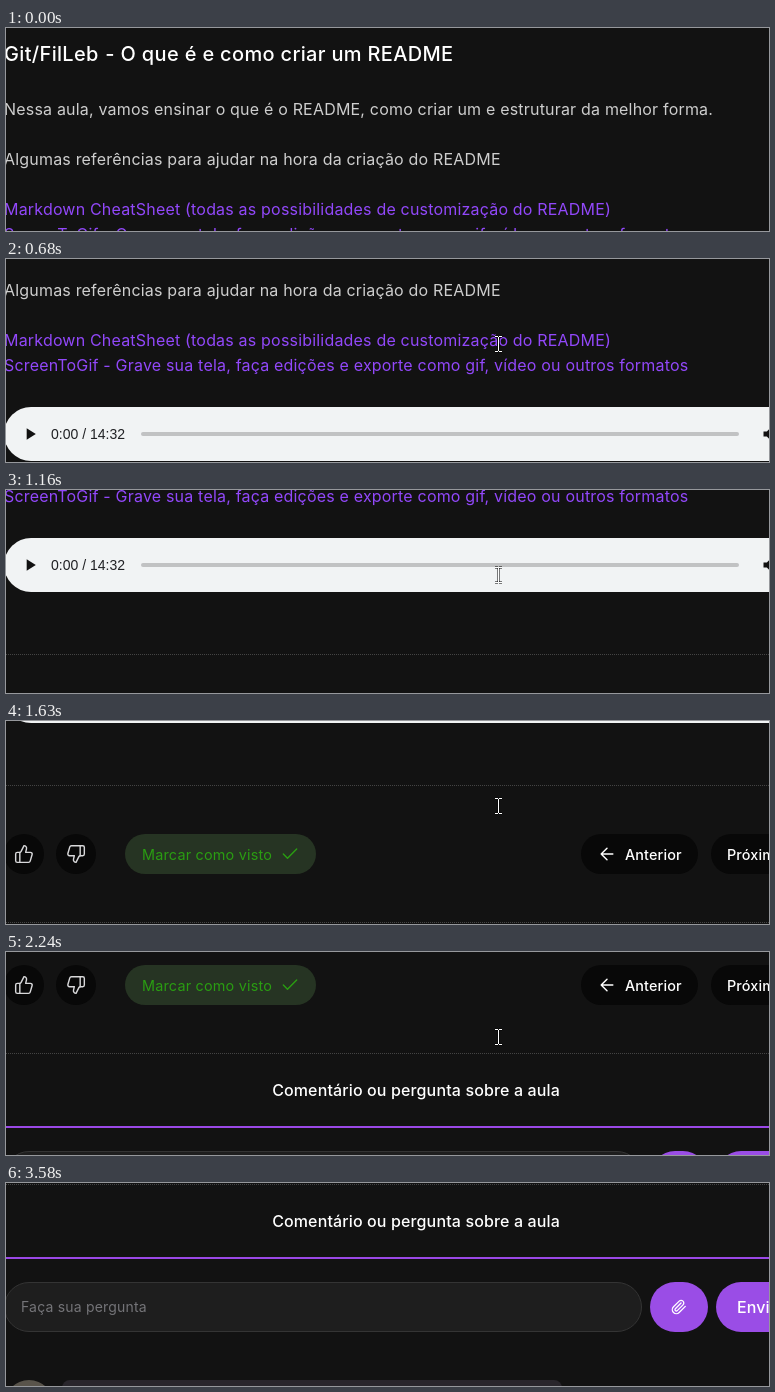
An HTML page for the animation above (4040 ms loop, 763 by 203 pixels).

```html
<!DOCTYPE html>
<html lang="pt-BR">
<head>
<meta charset="utf-8">
<title>Aula: README</title>
<style>
  html, body { margin: 0; width: 100%; height: 100%; overflow: hidden; background: #121212; }
  body { position: relative; font: 400 16px/25px Inter, "Noto Sans", sans-serif; font-optical-sizing: none;
         letter-spacing: .19px; color: #cecece; }
  #page, #page > *, #cursor { position: absolute; }
  #page { left: 0; top: 0; width: 763px; height: 760px; animation: scroll 4040ms step-end infinite; }
  #page > * { box-sizing: border-box; white-space: nowrap; }
  svg { fill: none; stroke: currentColor; stroke-width: 1.7; stroke-linecap: round; stroke-linejoin: round; flex: none; }

  .text { left: -2px; }
  .title { top: 14px; font-size: 20px; font-weight: 500; letter-spacing: .33px; color: #fff; }
  .title.rest { left: auto; right: 315.5px; }
  .link { color: #9248fa; }

  .audio { left: -2px; top: 248px; width: 820px; height: 54px; border-radius: 27px; background: #f1f3f4; }
  .audio * { position: absolute; }
  .audio svg { top: 17px; fill: #111; stroke: none; }
  .audio span { left: 47px; top: 15px; font: 14px/24px "Liberation Sans", Arial, sans-serif; letter-spacing: 0; color: #202124; }
  .audio i { left: 137px; top: 25px; width: 598px; height: 4px; border-radius: 2px; background: #c1c2c3; }

  .dots { left: 0; width: 763px; border-top: 1px dotted #444; }
  .pill { top: 413px; height: 40px; padding: 0 16px; border-radius: 20px; background: #080808; color: #fff;
          display: flex; align-items: center; gap: 8px; font-size: 14.4px; font-weight: 500; letter-spacing: .13px; }
  .round { width: 40px; padding: 0; justify-content: center; color: #d8d8da; }
  .seen { left: 119px; width: 191px; padding-left: 17px; justify-content: space-between;
          background: #263423; color: #2a9d12; font-weight: 400; letter-spacing: .2px; }

  .heading { left: 0; width: 820px; top: 526px; text-align: center; font-weight: 500; letter-spacing: .13px; color: #fff; }
  .rule { left: 0; top: 574px; width: 763px; height: 2px; background: #9a48e6; }
  .field { left: -2px; top: 599px; width: 638px; height: 50px; padding-left: 16px; border: 1px solid #343434;
           border-radius: 25px; background: #1e1e1e; color: #747478; font-size: 14px; line-height: 47px; }
  .action { top: 599px; height: 50px; border-radius: 25px; background: #9a4de6; color: #fff;
            display: flex; align-items: center; font-weight: 500; letter-spacing: .13px; }
  .avatar { left: -2px; top: 697px; width: 50px; height: 50px; border-radius: 50%; background: #59544b; }
  .comment { left: 56px; top: 697px; width: 500px; height: 60px; border-radius: 8px; background: #29262c; }

  #cursor { left: 488px; top: 76px; animation: pointer 4040ms step-end infinite; }
  #cursor path { stroke-linecap: butt; stroke-linejoin: miter; }

  /* five wheel notches of 100px, each eased */
  @keyframes scroll {
    0% { transform: none; }
    13.36% { transform: translateY(-23px); }
    15.09% { transform: translateY(-77px); }
    16.83% { transform: translateY(-100px); }
    23.51% { transform: translateY(-101px); }
    25.24% { transform: translateY(-136px); }
    26.98% { transform: translateY(-187px); }
    28.71% { transform: translateY(-200px); }
    36.88% { transform: translateY(-223px); }
    38.61% { transform: translateY(-277px); }
    40.34% { transform: translateY(-300px); }
    50.24% { transform: translateY(-301px); }
    51.98% { transform: translateY(-336px); }
    53.71% { transform: translateY(-387px); }
    55.44% { transform: translateY(-400px); }
    61.88% { transform: translateY(-401px); }
    63.61% { transform: translateY(-436px); }
    65.34% { transform: translateY(-487px); }
    67.07%, 100% { transform: translateY(-500px); }
  }
  @keyframes pointer {
    0% { transform: translate(200px, 140px); }
    1.73% { transform: translate(173px, 113px); }
    3.46% { transform: translate(112px, 68px); }
    5.19% { transform: translate(55px, 30px); }
    6.68% { transform: translate(14px, 8px); }
    8.41% { transform: none; }
    83.41% { transform: translate(24px, 12px); }
    85.14% { transform: translate(92px, 50px); }
    86.88% { transform: translate(177px, 108px); }
    88.61%, 100% { transform: translate(200px, 140px); }
  }
</style>
</head>
<body>
<div id="page">
  <div class="text title">Git/FilLeb</div>
  <div class="text title rest">- O que é e como criar um README</div>
  <div class="text" style="top:69px">Nessa aula, vamos ensinar o que é o README, como criar um e estruturar da melhor forma.</div>
  <div class="text" style="top:119px">Algumas referências para ajudar na hora da criação do README</div>
  <div class="text link" style="top:169px">Markdown CheatSheet (todas as possibilidades de customização do README)</div>
  <div class="text link" style="top:194px">ScreenToGif - Grave sua tela, faça edições e exporte como gif, vídeo ou outros formatos</div>

  <div class="audio">
    <svg style="left:15.5px" width="20" height="20" viewBox="0 0 24 24"><path d="M8 5v14l11-7z"/></svg>
    <span>0:00 / 14:32</span>
    <i></i>
    <svg style="left:756.5px" width="20" height="20" viewBox="0 0 24 24"><path d="M3 9v6h4l5 5V4L7 9z"/></svg>
  </div>

  <div class="dots" style="top:364px"></div>
  <div class="pill round" style="left:-2px">
    <svg width="20" height="20" viewBox="0 0 24 24"><g id="thumb"><path d="M7 10v12"/><path d="M15 5.88 14 10h5.83a2 2 0 0 1 1.92 2.56l-2.33 8A2 2 0 0 1 17.5 22H4a2 2 0 0 1-2-2v-8a2 2 0 0 1 2-2h2.76a2 2 0 0 0 1.79-1.11L12 2a3.13 3.13 0 0 1 3 3.88Z"/></g></svg>
  </div>
  <div class="pill round" style="left:50px">
    <svg width="20" height="20" viewBox="0 0 24 24"><use href="#thumb" transform="rotate(180 12 12)"/></svg>
  </div>
  <div class="pill seen">Marcar como visto
    <svg width="20" height="20" viewBox="0 0 24 24"><path d="M20 6 9 17l-5-5"/></svg>
  </div>
  <div class="pill" style="left:575px;width:117px">
    <svg width="20" height="20" viewBox="0 0 24 24"><path d="m12 19-7-7 7-7M19 12H5"/></svg>Anterior
  </div>
  <div class="pill" style="left:705px">Próximo</div>
  <div class="dots" style="top:501px"></div>

  <div class="heading">Comentário ou pergunta sobre a aula</div>
  <div class="rule"></div>
  <div class="field">Faça sua pergunta</div>
  <div class="action" style="left:644px;width:58px;justify-content:center">
    <svg width="16" height="16" viewBox="0 0 24 24" style="stroke-width:2"><path d="m21.44 11.05-9.19 9.19a6 6 0 0 1-8.49-8.49l8.57-8.57A4 4 0 1 1 18 8.84l-8.59 8.57a2 2 0 0 1-2.83-2.83l8.49-8.48"/></svg>
  </div>
  <div class="action" style="left:710px;padding:0 21px">Enviar</div>
  <div class="avatar"></div>
  <div class="comment"></div>
</div>

<svg id="cursor" width="9" height="18" viewBox="0 0 9 18">
  <path d="M1 1.5h3M5 1.5h3M4.5 2v14M1 16.5h3M5 16.5h3" stroke="#000" stroke-width="2"/>
  <path d="M1 1.5h3M5 1.5h3M4.5 2v14M1 16.5h3M5 16.5h3" stroke="#fff" stroke-width="1"/>
</svg>
</body>
</html>
```
